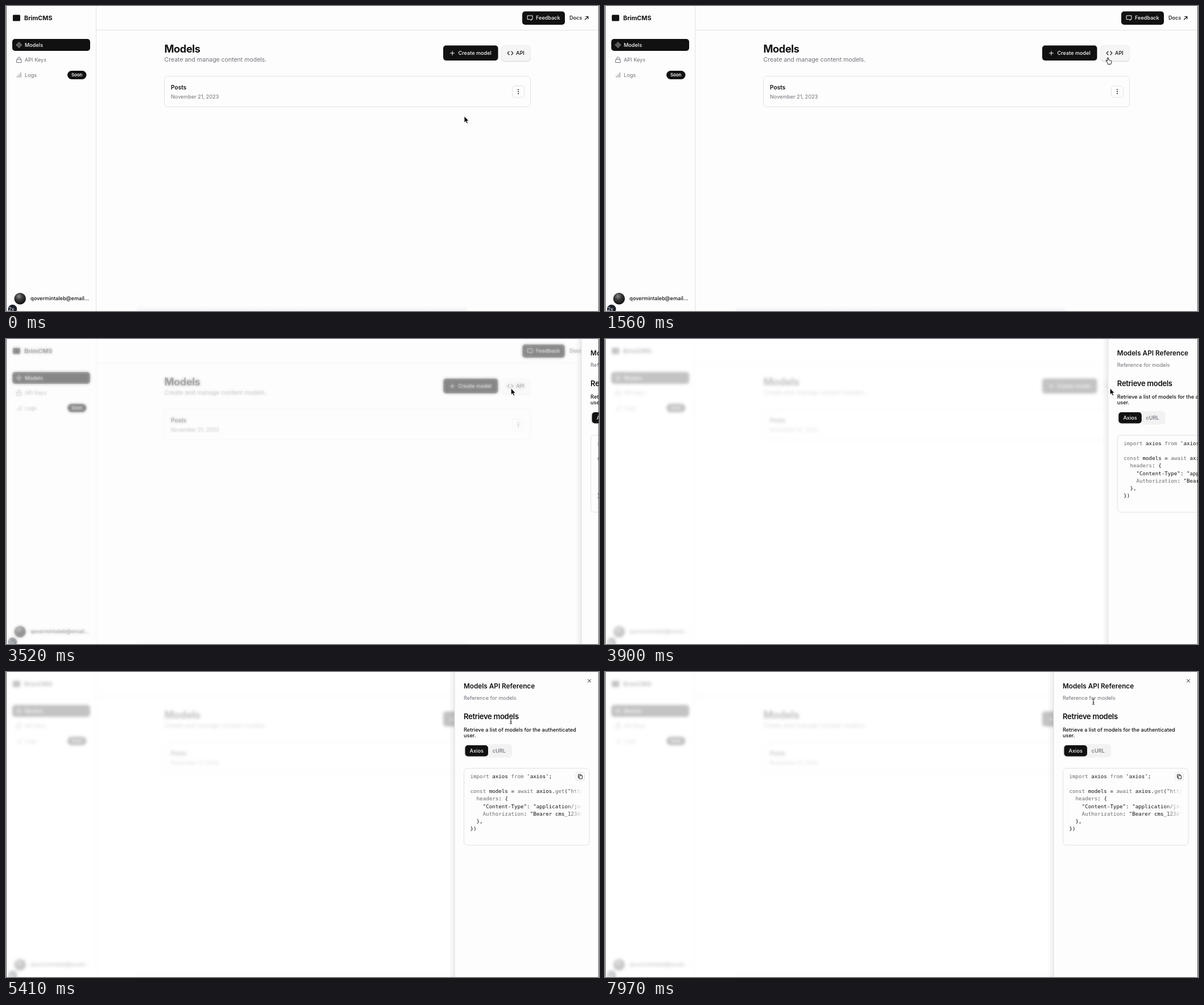
Recreate the animation shown at these times as an HTML page. Size 1043x537 px, loop 8000 ms.

```html
<!DOCTYPE html>
<html lang="en">
<head>
<meta charset="utf-8">
<title>Content models</title>
<style>
html, body { margin: 0; width: 100%; height: 100%; overflow: hidden; background: #fdfdfd; }
#stage { position: absolute; left: 0; top: 0; width: 1043px; height: 537px; overflow: hidden; }
#stage > * { position: absolute; left: 0; top: 0; }
svg { display: block; overflow: visible; font: 500 9.15px Inter, sans-serif; fill: #111; }
.muted { fill: #71717a; font-weight: 400; }
.light { fill: #fafafa; }
.bold { font-weight: 600; }
.box { fill: #fdfdfd; stroke: #e2e2e5; }
.icon { fill: none; stroke: #18181b; stroke-width: 1; stroke-linecap: round; stroke-linejoin: round; }
.icon.muted { stroke: #71717a; }
.icon.light { stroke: #fafafa; }
.code { font: 9.2px "DejaVu Sans Mono", monospace; white-space: pre; }
.code .k { fill: #6b6b73; }
#veil { width: 1043px; height: 537px; background: rgba(255,255,255,.75); backdrop-filter: blur(2.6px); }
#frame { width: 1041px; height: 537px; border: solid #55555c; border-width: 0 1px; }
</style>
</head>
<body>
<div id="stage">
  <svg width="1043" height="537">
    <defs>
      <radialGradient id="face" cx=".4" cy=".3" r=".75">
        <stop offset="0" stop-color="#8b8b8b"/><stop offset=".4" stop-color="#3a3a3a"/><stop offset="1" stop-color="#0c0c0c"/>
      </radialGradient>
      <linearGradient id="foot" x2="0" y2="1">
        <stop offset="0" stop-color="#fdfdfd"/><stop offset="1" stop-color="#f3f3f8"/>
      </linearGradient>
      <linearGradient id="fade">
        <stop offset="0" stop-color="#fdfdfd" stop-opacity="0"/><stop offset="1" stop-color="#fdfdfd"/>
      </linearGradient>
      <linearGradient id="shade">
        <stop offset="0" stop-color="#000" stop-opacity="0"/><stop offset="1" stop-color="#000" stop-opacity=".07"/>
      </linearGradient>
      <clipPath id="codeClip"><path d="M806 170H1013V304H806Z"/></clipPath>
    </defs>
    <rect width="1043" height="537" fill="#fdfdfd"/>
    <rect x="230" y="528" width="580" height="9" fill="url(#foot)"/>
    <path d="M158.5 0V537M159 42.5H1043" stroke="#e2e2e5"/>

    <rect x="12" y="15.500" width="13" height="11" rx="1.500"/>
    <text x="32" y="25" class="bold" font-size="10.700" style="font-weight:700;font-size:10.8px">BrimCMS</text>
    <rect x="11" y="58" width="137" height="21" rx="5"/>
    <path class="icon light" d="M23 64l1.700 1.700L23 67.400l-1.700-1.700zM23 70l1.700 1.700L23 73.400l-1.700-1.700zM20 67l1.700 1.700L20 70.400l-1.700-1.700zM26 67l1.700 1.700L26 70.400l-1.700-1.700z" style="stroke-width:.8"/>
    <text x="33" y="72" class="light">Models</text>
    <path class="icon muted" d="M19 94h8v5.500h-8zM20.700 94v-1.800a2.300 2.300 0 0 1 4.600 0V94"/>
    <text x="33" y="98.300" class="muted">API Keys</text>
    <path class="icon muted" d="M20 125.500v-2M23 125.500v-5M26 125.500v-8"/>
    <text x="33" y="124.800" class="muted">Logs</text>
    <rect x="108" y="114" width="33.500" height="15" rx="7.500"/>
    <text x="124.700" y="123.500" class="light bold" text-anchor="middle" style="font-size:7.8px">Soon</text>

    <rect x="908" y="9.500" width="75" height="23.500" rx="5"/>
    <path class="icon light" d="M917.500 17h8.500v6.500h-2.300v2l-2.500-2h-3.700z"/>
    <text x="932" y="24.300" class="light">Feedback</text>
    <text x="991" y="24.300">Docs</text>
    <path class="icon" d="M1018.500 24l5-5M1019.500 18.500h4.300v4.300" style="stroke-width:1.200"/>

    <text x="278.500" y="82" style="font-weight:700;font-size:18.300px;letter-spacing:-.025em">Models</text>
    <text x="278.500" y="98.300" class="muted" style="font-size:10.500px">Create and manage content models.</text>
    <rect x="769" y="69.500" width="96.500" height="26.500" rx="5"/>
    <path class="icon light" d="M781.500 83h7M785 79.500v7"/>
    <text x="795.500" y="86.200" class="light">Create model</text>
    <rect x="871" y="70.500" width="52" height="28" rx="6" fill="#e3e3e5"/>
    <rect x="871.500" y="69.500" width="51" height="27" rx="5.500" fill="#f5f5f5" stroke="#ececee"/>
    <path class="icon" d="M885 80l-2.800 3 2.800 3M889 80l2.800 3-2.800 3" style="stroke-width:1.100"/>
    <text x="897" y="86.200">API</text>

    <rect class="box" x="278.500" y="123.500" width="644" height="54" rx="6"/>
    <text x="290" y="146.700" class="bold" style="font-size:10.200px">Posts</text>
    <text x="290" y="163" class="muted">November 21, 2023</text>
    <rect class="box" x="890.500" y="140.500" width="21" height="20.500" rx="5"/>
    <path d="M901 147.300v.01M901 150.800v.01M901 154.300v.01" stroke="#111" stroke-width="1.900" stroke-linecap="round"/>

    <circle cx="24.700" cy="515.300" r="10.300" fill="url(#face)"/>
    <text x="43" y="518.200">qovermintaleb@email...</text>
    <circle cx="11.500" cy="533.500" r="7.800" fill="#1c212b"/>
    <text x="4.500" y="536.500" style="fill:#d5d8de;font-size:8.500px">2x</text>
  </svg>

  <div id="veil"></div>

  <svg id="panel" width="1043" height="537">
    <rect x="779" width="10" height="537" fill="url(#shade)"/>
    <rect x="789" width="254" height="537" fill="#fdfdfd"/>
    <path d="M789 0V537" stroke="#e0e0e2"/>
    <path class="icon" d="M1023.500 13l5 5M1028.500 13l-5 5"/>
    <text x="805" y="29.200" class="bold" style="font-size:11.750px">Models API Reference</text>
    <text x="805" y="49.300" class="muted">Reference for models</text>
    <text x="805" y="82.700" class="bold" style="font-size:13.100px;letter-spacing:-.025em">Retrieve models</text>
    <text x="805" y="104.800">Retrieve a list of models for the authenticated</text>
    <text x="805" y="114.500">user.</text>
    <rect x="805" y="127" width="85" height="23.500" rx="6" fill="#f2f2f2"/>
    <rect x="807.500" y="129" width="40.500" height="19.500" rx="5"/>
    <text x="827.700" y="141.800" class="light" text-anchor="middle">Axios</text>
    <text x="867.300" y="141.800" class="muted" text-anchor="middle" style="font-weight:500">cURL</text>
    <rect class="box" x="805.500" y="169.500" width="220.500" height="135.500" rx="6"/>
    <g id="code" class="code" clip-path="url(#codeClip)"></g>
    <rect x="984" y="199" width="30" height="90" fill="url(#fade)"/>
    <rect class="box" x="1002.500" y="176.500" width="15" height="15" rx="4"/>
    <path class="icon" d="M1008.500 182.500h5v5.500h-5zM1008 186h-1.500v-5.700h5v1.700" style="stroke-width:.9"/>
  </svg>

  <div id="frame"></div>

  <svg id="cursor" width="20" height="20">
    <path id="arrow" d="M0 0V11.300L2.600 9l1.900 4 1.900-.9L4.600 8.300H8z" fill="#000" stroke="#fff" stroke-width=".8"/>
    <path id="hand" d="M-1 8.200L-3.200 5.800Q-3.600 4.400-2.400 4.600L-1 6V1a1 1 0 0 1 2 0V4q1.600-.7 1.900.5 1.500-.5 1.700.6 1.500-.2 1.500 1.200V8.500q0 1.500-1 3H0q-.4-1.200-1-2z" fill="#fff" stroke="#111"/>
    <g id="beam" fill="none">
      <path d="M-2-5Q0-5 0-4 0-5 2-5M0-4V4M-2 5Q0 5 0 4 0 5 2 5M-1 1.500h2" stroke="#fff" stroke-width="2"/>
      <path d="M-2-5Q0-5 0-4 0-5 2-5M0-4V4M-2 5Q0 5 0 4 0 5 2 5M-1 1.500h2" stroke="#111"/>
    </g>
  </svg>
</div>
<script>
const LOOP = 8000, OPEN = 3340, SLIDE = 1555, FADE = 466;
const $ = id => document.getElementById(id);
const clamp = v => Math.min(1, Math.max(0, v));

// Words between bars are muted.
const lines = [
  "|import| axios |from| 'axios';",
  "",
  '|const| models = |await| axios.|get|("https://',
  "  |headers|: {",
  '    "Content-Type": "application/json",',
  '    |Authorization|: "Bearer cms_12345',
  "  },",
  "})"
];
$("code").innerHTML = lines.map((line, i) => {
  const spans = line.split("|").map((s, j) => j % 2 ? `<tspan class="k">${s}</tspan>` : s).join("");
  return `<text x="816.5" y="${187 + i * 13.15}" xml:space="preserve">${spans}</text>`;
}).join("");

// CSS "ease": cubic-bezier(.25, .1, .25, 1)
function ease(x) {
  let lo = 0, hi = 1;
  const curve = (s, a, b) => 3 * a * s * (1 - s) ** 2 + 3 * b * s * s * (1 - s) + s ** 3;
  for (let i = 0; i < 24; i++) {
    const mid = (lo + hi) / 2;
    if (curve(mid, .25, .25) < x) lo = mid; else hi = mid;
  }
  return curve(lo, .1, 1);
}

// time, x, y
const path = [
  [0, 806, 194], [1150, 884.5, 91], [1650, 884.5, 91], [2700, 888.3, 87],
  [5900, 888, 86], [7600, 859, 52], [LOOP, 859, 52]
];
function pointer(t) {
  const i = path.findIndex(p => p[0] > t), [t0, x0, y0] = path[i - 1], [t1, x1, y1] = path[i];
  const u = (t - t0) / (t1 - t0), s = u * u * (3 - 2 * u);
  return [x0 + (x1 - x0) * s, y0 + (y1 - y0) * s];
}

function draw(now) {
  const t = now % LOOP, [x, y] = pointer(t);
  $("veil").style.opacity = ease(clamp((t - OPEN) / FADE));
  $("veil").style.display = $("panel").style.display = t < OPEN ? "none" : "block";
  $("panel").style.transform = `translateX(${254 * (1 - ease(clamp((t - OPEN) / SLIDE)))}px)`;
  $("cursor").style.transform = `translate(${x}px, ${y}px)`;
  const shape = t > 4950 ? "beam" : t < OPEN + 60 && x > 871 && y < 97 ? "hand" : "arrow";
  for (const id of ["arrow", "hand", "beam"]) $(id).style.display = id === shape ? "" : "none";
  requestAnimationFrame(draw);
}
draw(0);
</script>
</body>
</html>
```
